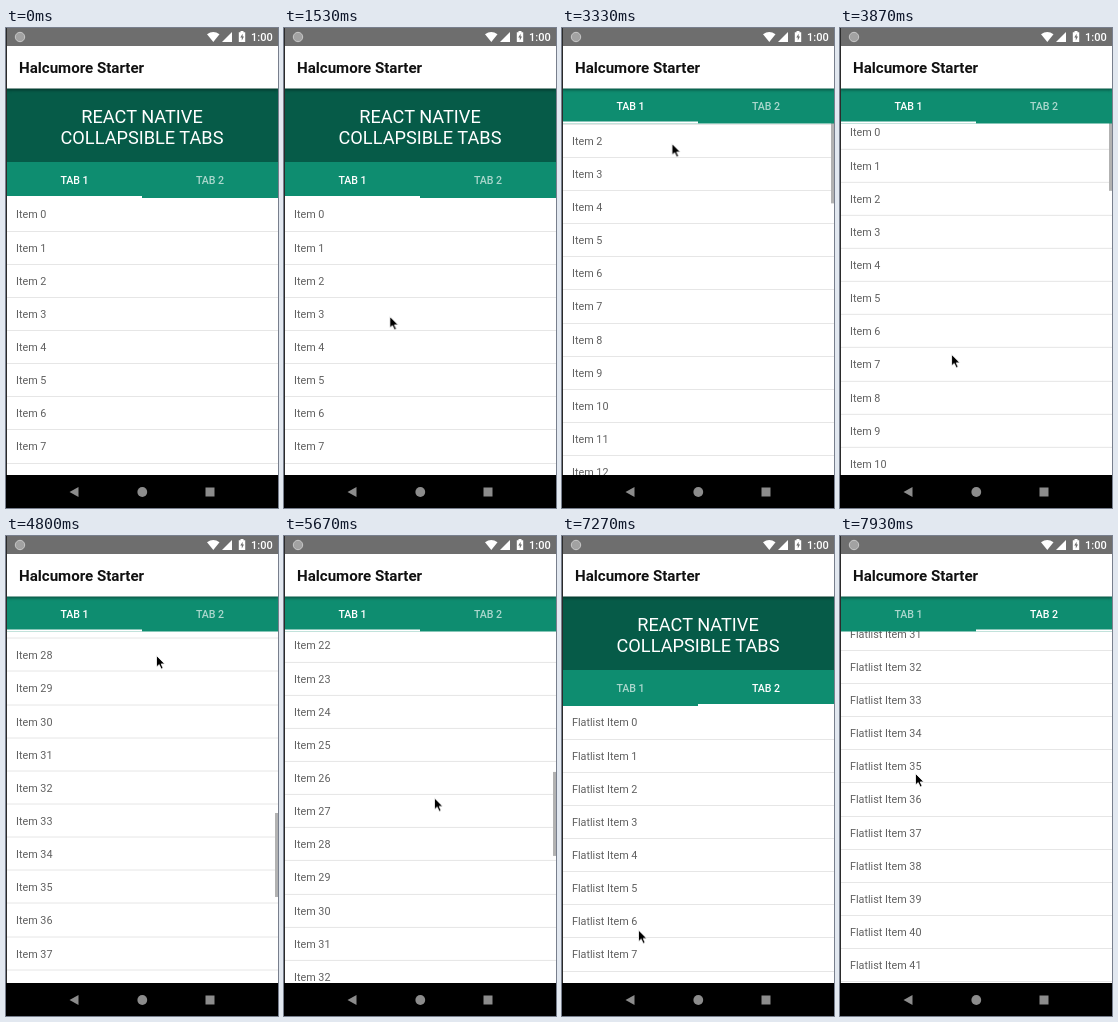
Write an HTML page that moves like this. It is 272 px wide and 480 px high and loops after 8 s.

```html
<!DOCTYPE html>
<html lang="en">
<head>
<meta charset="utf-8">
<title>Collapsible tabs</title>
<style>
@property --scroll1 { syntax: "<number>"; inherits: true; initial-value: 0; }
@property --scroll2 { syntax: "<number>"; inherits: true; initial-value: 0; }
@property --fold { syntax: "<number>"; inherits: true; initial-value: 0; }
@property --page { syntax: "<number>"; inherits: true; initial-value: 0; }

html, body { margin: 0; width: 100%; height: 100%; overflow: hidden; background: #fff; }
#stage {
  position: relative; width: 272px; height: 480px; overflow: hidden;
  font-family: Roboto, "Noto Sans", sans-serif;
  animation: 8s linear infinite;
  animation-name: scroll1, scroll2, fold, page;
}
#stage div, #stage svg { position: absolute; }

.status { inset: 0 0 auto; height: 18px; background: #6e6e6e; }
.clock { left: 245px; top: 2px; font: 500 11px/15px Roboto, sans-serif; color: #fff; }
.appbar {
  left: 0; top: 18px; width: 272px; height: 42px; background: #fff;
  border-bottom: 1px solid rgba(255, 255, 255, .5); background-clip: padding-box;
  box-shadow: 0 1px 3px rgba(0, 0, 0, .45);
}
.title { left: 13px; top: 12px; font-size: 15.1px; line-height: 20px; font-weight: 700; color: #111; white-space: nowrap; }
.nav { left: 0; top: 447px; width: 272px; height: 33px; background: #000; }
.edge { left: 0; top: 0; width: 1px; height: 447px; background: #2b2b2b; }

.view { left: 0; top: 60px; width: 272px; height: 387px; overflow: hidden; background: #fff; }
.pages { left: 0; top: 0; width: 544px; height: 387px; transform: translateX(calc(var(--page) * -272px)); }
.page { top: 0; width: 272px; height: 387px; overflow: hidden; }
.page + .page { left: 272px; }
.list { left: 0; top: 110.4px; width: 272px; }
.list p {
  box-sizing: border-box; height: 33.15px; margin: 0; padding-left: 10px;
  border-bottom: 1px solid #e6e6e6;
  font-size: 10.8px; line-height: 33px; color: #606060; white-space: nowrap;
}
#list1 { transform: translateY(calc(var(--scroll1) * -1px)); }
#list2 { transform: translateY(calc(var(--scroll2) * -1px)); }
.thumb {
  left: 269px; top: 1px; width: 3px; height: 84px; background: #b2b2b2;
  transform: translateY(calc(var(--scroll1) * .217px));
}

.header { left: 0; top: 0; width: 272px; height: 110px; transform: translateY(calc(var(--fold) * -1px)); }
.hero {
  left: 0; top: 0; width: 272px; height: 74px; padding-top: 18px; box-sizing: border-box;
  background: #065b48; color: #fff; text-align: center; font-size: 18.2px; line-height: 21.3px;
}
.tabs { left: 0; top: 74px; width: 272px; height: 36px; background: #0e8d70; }
.tab { left: .5px; top: 0; width: 136px; text-align: center; font-size: 10.6px; line-height: 37px; font-weight: 500; color: #fff; }
.tab:nth-child(1) { opacity: calc(1 - .35 * var(--page)); }
.tab:nth-child(2) { left: 136px; opacity: calc(.65 + .35 * var(--page)); }
.line {
  left: 0; bottom: 0; width: 136px; height: 2px; background: #fff;
  transform: translateX(calc(var(--page) * 136px));
}
#cursor { left: 0; top: 0; overflow: visible; animation: move 8s linear infinite, show 8s step-end infinite; }

@keyframes scroll1 {
  0%, 32.5% { --scroll1: 0; }
  35% { --scroll1: 81; animation-timing-function: ease-out; }
  38%, 43.5% { --scroll1: 140; }
  48.375% { --scroll1: 80.7; }
  52.5%, 55.2% { --scroll1: 560; }
  60% { --scroll1: 995; animation-timing-function: ease-out; }
  64.1%, 66.2% { --scroll1: 1085; }
  70.875% { --scroll1: 807.6; }
  76.6% { --scroll1: 110; }
  79% { --scroll1: 0; }
  80.875% { --scroll1: -3.5; }
  82%, 100% { --scroll1: 0; }
}
@keyframes scroll2 {
  0%, 91% { --scroll2: 0; }
  93% { --scroll2: 250; animation-timing-function: ease-out; }
  98.4%, 100% { --scroll2: 1116; }
}
@keyframes fold {
  0%, 33% { --fold: 0; }
  35% { --fold: 52; }
  36.5%, 76.8% { --fold: 74.5; }
  79.5%, 91.2% { --fold: 0; }
  93%, 100% { --fold: 74.5; }
}
@keyframes page {
  0%, 82.5% { --page: 0; animation-timing-function: ease-out; }
  86.5%, 100% { --page: 1; }
}
@keyframes show {
  0% { opacity: 0; }
  .84%, 100% { opacity: 1; }
}
@keyframes move {
  0%, .84% { transform: translate(248px, 105px); }
  2.5% { transform: translate(96px, 200px); }
  4.1%, 7.5% { transform: translate(136px, 318px); }
  9% { transform: translate(102px, 336px); }
  11% { transform: translate(104px, 107px); }
  12.5%, 18.4% { transform: translate(106px, 250px); }
  20.5% { transform: translate(104px, 358px); }
  23.4%, 29.1% { transform: translate(104px, 239px); }
  30.9%, 33% { transform: translate(102px, 256px); }
  35%, 38% { transform: translate(108px, 102px); }
  43% { transform: translate(110px, 120px); }
  48.375% { transform: translate(111px, 327px); }
  50.5% { transform: translate(115px, 130px); }
  52.5%, 55.5% { transform: translate(148px, 330px); }
  59%, 60% { transform: translate(150px, 119px); }
  64%, 66.3% { transform: translate(150px, 125px); }
  70.875% { transform: translate(150px, 261px); }
  74% { transform: translate(150px, 380px); }
  76.6% { transform: translate(160px, 330px); }
  80%, 88% { transform: translate(208px, 156px); }
  90.8% { transform: translate(76px, 400px); }
  93%, 100% { transform: translate(75px, 237px); }
}
</style>
</head>
<body>
<div id="stage">
  <div class="view">
    <div class="pages">
      <div class="page"><div class="list" id="list1"></div><div class="thumb"></div></div>
      <div class="page"><div class="list" id="list2"></div></div>
    </div>
    <div class="header">
      <div class="hero">REACT NATIVE<br>COLLAPSIBLE TABS</div>
      <div class="tabs">
        <div class="tab">TAB 1</div>
        <div class="tab">TAB 2</div>
        <div class="line"></div>
      </div>
    </div>
  </div>

  <div class="appbar"><div class="title">Halcumore Starter</div></div>

  <div class="status">
    <svg width="272" height="18" fill="#fff">
      <circle cx="14" cy="9" r="4.7" fill="#a2a2a2" stroke="#c8c8c8"/>
      <path d="M201 6.2Q207.3 2 213.5 6.2L207.3 14Z"/>
      <path d="M226 4V14H216Z"/>
      <path d="M234.5 3h3v1.2h1.7V14h-6.4V4.2h1.7Z"/>
      <path d="M236.6 5.8l-2.3 3.8h1.5v2.8l2.2-3.9h-1.4Z" fill="#6e6e6e"/>
    </svg>
    <div class="clock">1:00</div>
  </div>

  <div class="nav">
    <svg width="272" height="33" fill="#8c8c8c">
      <path d="M63.5 17L72.5 12V22Z"/>
      <circle cx="136.3" cy="17" r="4.9"/>
      <rect x="199.5" y="12.5" width="9" height="9"/>
    </svg>
  </div>
  <div class="edge"></div>

  <svg id="cursor" width="10" height="16">
    <path d="M.5 .5V12L3.2 9.6L5.2 14L7.1 13.1L5.2 8.9H8.8Z" fill="#000" stroke="#fff" stroke-width=".8"/>
  </svg>
</div>
<script>
const fill = (id, label) => {
  const rows = Array.from({ length: 50 }, (_, i) => `<p>${label} ${i}</p>`);
  document.getElementById(id).innerHTML = rows.join("");
};
fill("list1", "Item");
fill("list2", "Flatlist Item");
</script>
</body>
</html>
```
